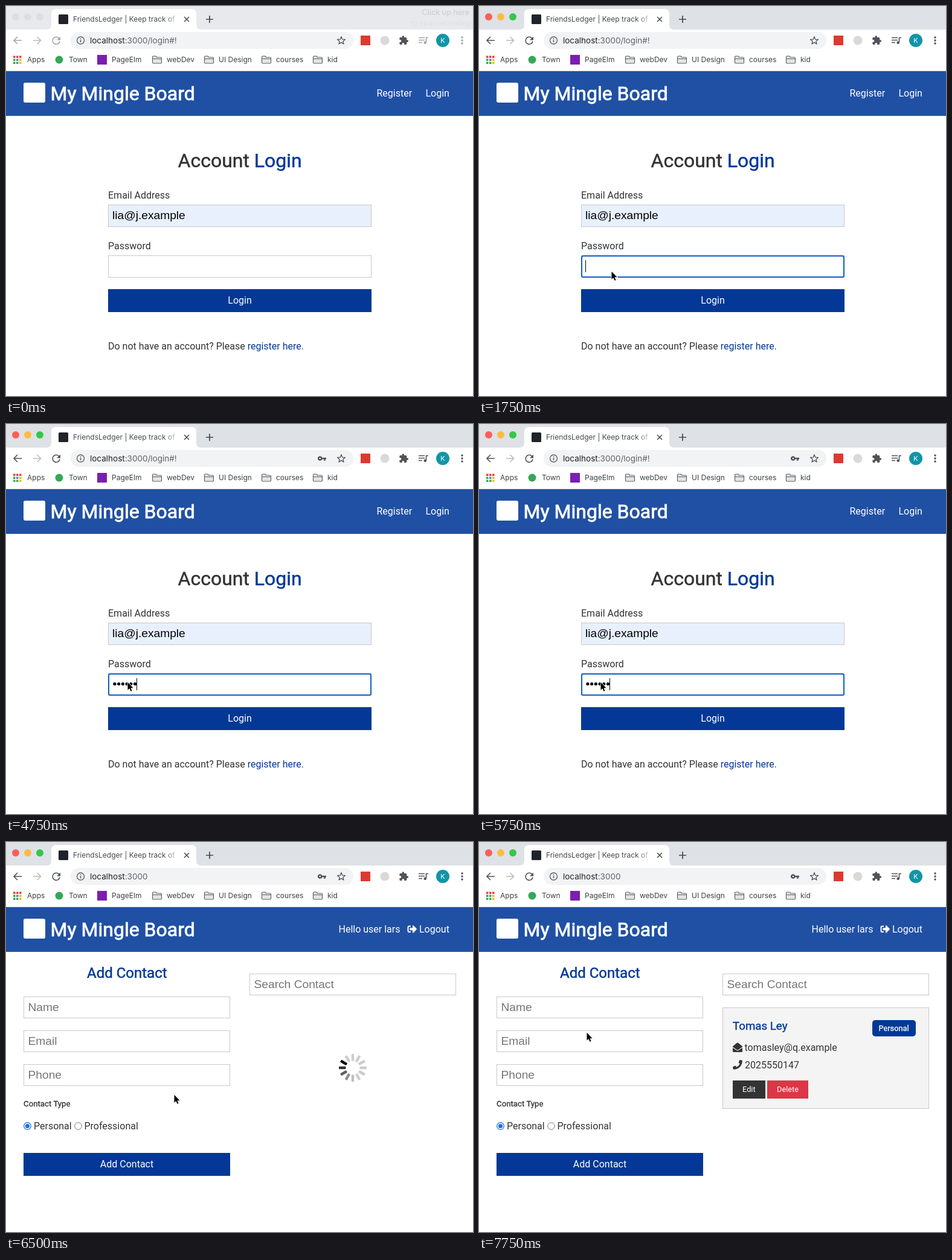
Write an HTML page that moves like this. It is 773 by 646 pixels and loops after 8000 ms.

```html
<!DOCTYPE html>
<html lang="en">
<head>
<meta charset="utf-8">
<title>Contact book login</title>
<style>
html, body { margin: 0; width: 100%; height: 100%; overflow: hidden; background: #fff; }
svg { display: block; width: 773px; height: 646px; }
text { white-space: pre; }
.ui { font-family: Inter, sans-serif; }
.page { font-family: Roboto, sans-serif; }
.field { font-family: "Liberation Sans", Arial, sans-serif; font-size: 19.2px; }
</style>
</head>
<body>
<svg id="stage" viewBox="0 0 773 646" xmlns="http://www.w3.org/2000/svg"></svg>
<script>
const LOOP = 8000;
const BLUE = '#033896', DARK = '#333', ICON = '#505357', FADED = '#a2a5a9';

const text = (cls, x, y, size, fill, s, more = '') =>
  `<text class="${cls}" x="${x}" y="${y}" font-size="${size}" fill="${fill}" ${more}>${s}</text>`;
const ui = (...a) => text('ui', ...a);
const page = (...a) => text('page', ...a);
const heavy = (x, y, size, fill, s, w = 0.5) =>
  page(x, y, size, fill, s, `stroke="${fill}" stroke-width="${w}"`);
const field = (x, y, fill, s) => `<text class="field" x="${x}" y="${y}" fill="${fill}">${s}</text>`;
const rect = (x, y, w, h, fill, more = '') =>
  `<rect x="${x}" y="${y}" width="${w}" height="${h}" fill="${fill}" ${more}/>`;
const box = (x, y, w, h, fill = '#fff') =>
  rect(x + 0.5, y + 0.5, w - 1, h - 1, fill, 'stroke="#c8c8c8"');
const disc = (x, y, r, fill, more = '') => `<circle cx="${x}" cy="${y}" r="${r}" fill="${fill}" ${more}/>`;
const path = (d, fill, more = '') => `<path d="${d}" fill="${fill}" ${more}/>`;
const line = (d, color, w = 1.6, more = '') =>
  path(d, 'none', `stroke="${color}" stroke-width="${w}" ${more}`);
const group = (id, body, more = '') => `<g id="${id}" ${more}>${body}</g>`;
const at = (x, y, k) => `transform="translate(${x} ${y}) scale(${k})"`;

const folder = x =>
  path(`M${x + 0.5} 84.5q0-1.5 1.5-1.5h4l1.7 2h6.3q1.5 0 1.5 1.5v7q0 1.5-1.5 1.5h-12q-1.5 0-1.5-1.5z`,
    '#e4e4e4', 'stroke="#5f6368" stroke-width="1.2"') +
  line(`M${x + 1} 87.5h14`, '#5f6368', 1);

function star(cx, cy, R, r) {
  let d = '';
  for (let i = 0; i < 10; i++) {
    const a = i * Math.PI / 5 - Math.PI / 2, q = i % 2 ? r : R;
    d += (i ? 'L' : 'M') + (cx + q * Math.cos(a)).toFixed(2) + ' ' + (cy + q * Math.sin(a)).toFixed(2);
  }
  return d + 'z';
}

function appGrid() {
  const colors = ['#ea4335', '#ea4335', '#ea4335', '#34a853', '#4285f4', '#fbbc05', '#34a853', '#34a853', '#fbbc05'];
  return colors.map((c, i) => rect(12 + (i % 3) * 5, 82.5 + Math.floor(i / 3) * 5, 3.5, 3.5, c)).join('');
}

// Controls whose colour depends on window focus
function controls(active) {
  const c = active ? ICON : FADED;
  const lights = active ? ['#fc5f58', '#fdbc40', '#34c748'] : ['#dcdee1', '#dcdee1', '#dcdee1'];
  return lights.map((f, i) => disc(16 + 20 * i, 18, 6, f)).join('') +
    line('M26 57H13.5M19 51l-6 6 6 6', c) +
    line('M87.5 53.2A6 6 0 1 0 89 58.5', c) + path('M90 50.5v6h-6z', c) +
    line('M683 52.5h10M683 56.5h10M683 60.5h6', c) +
    line('M695.5 60V52.5h3.5', c) + disc(693.7, 60.7, 2.3, c) +
    [52, 57, 62].map(y => disc(755, y, 1.7, c)).join('');
}

const chrome =
  rect(0, 0, 773, 39, '#dee1e6', 'id="strip"') +
  path('M67 39q8 0 8-8V13q0-8 8-8h224q8 0 8 8v18q0 8 8 8z', '#fff') +
  rect(0, 39, 773, 68, '#fff') +
  rect(0, 107, 773, 1, '#d8dade') +
  rect(87, 14, 16, 16, '#20232a', 'rx="1.5"') +
  ui(111, 26, 12, 'url(#fade)', 'FriendsLedger | Keep track of') +
  line('M295 18l8 8M303 18l-8 8', '#45494d', 1.5) +
  line('M337 16v12M331 22h12', '#45494d', 1.7) +
  group('idle', controls(false) +
    group('hint', ui(767, 15, 12.5, '#cdcfd2', 'Click up here', 'text-anchor="end" font-weight="500"') +
      ui(770, 33, 12.5, '#dfe1e4', 'to stop recording', 'text-anchor="end"'))) +
  group('active', controls(true)) +
  line('M45 57h12.5M51.5 51l6 6-6 6', '#b9bcbf') +
  rect(107, 43, 468, 28, '#f1f3f4', 'rx="14"') +
  disc(123.5, 57, 6, 'none', 'stroke="#5f6368" stroke-width="1.4"') +
  rect(122.7, 56, 1.6, 4.2, '#5f6368') + rect(122.7, 53.4, 1.6, 1.6, '#5f6368') +
  ui(139, 62, 13.5, '#202124', 'localhost<tspan fill="#5f6368">:3000<tspan id="route">/login#!</tspan></tspan>') +
  group('key', path('M12.65 10C11.83 7.67 9.61 6 7 6c-3.31 0-6 2.69-6 6s2.69 6 6 6c2.61 0 4.83-1.67 5.65-4H17v4h4v-4h2v-4H12.65zM7 14c-1.1 0-2-.9-2-2s.9-2 2-2 2 .9 2 2-.9 2-2 2z',
    ICON, at(515.3, 49.3, 0.64))) +
  line(star(555, 57.5, 6.8, 2.9), ICON, 1.3, 'stroke-linejoin="round"') +
  rect(587, 49, 16, 16, '#dc3a2f') +
  disc(627, 57, 7.5, '#d9d9d9') +
  path('M20.5 11H19V7c0-1.1-.9-2-2-2h-4V3.5a2.5 2.5 0 0 0-5 0V5H4c-1.1 0-2 .9-2 2v3.8h1.5a2.7 2.7 0 0 1 0 5.4H2V20c0 1.1.9 2 2 2h3.8v-1.5a2.7 2.7 0 0 1 5.4 0V22H17c1.1 0 2-.9 2-2v-4h1.5a2.5 2.5 0 0 0 0-5z',
    ICON, at(650, 48.5, 0.7)) +
  disc(723, 57, 11, '#1295a6') +
  ui(723, 61, 11, '#fff', 'K', 'text-anchor="middle"') +
  appGrid() +
  disc(88, 89, 6.5, '#34a853') +
  rect(151, 81, 16, 16, '#7a1fb0') +
  [242, 328, 423, 508].map(folder).join('') +
  [[35, 'Apps'], [104, 'Town'], [175, 'PageElm'], [266, 'webDev'], [352, 'UI Design'], [447, 'courses'], [532, 'kid']]
    .map(([x, s]) => ui(x, 93, 12, '#3c4043', s)).join('');

const banner =
  rect(0, 108, 773, 74, '#2050a3') +
  rect(29, 127, 36, 33, '#fff', 'rx="3"') +
  heavy(73.5, 155.5, 32, '#fff', 'My Mingle Board', 0.8);

const login =
  page(613.5, 150, 16, '#fff', 'Register') + page(694.5, 150, 16, '#fff', 'Login') +
  heavy(284.5, 266.5, 32, DARK, `Account <tspan fill="${BLUE}" stroke="${BLUE}">Login</tspan>`) +
  page(169, 319, 16, DARK, 'Email Address') +
  box(169, 329, 436, 37, '#e8f0fe') + field(176, 353, '#000', 'lia@j.example') +
  page(169, 403, 16, DARK, 'Password') +
  box(169, 413, 436, 37) +
  group('focus', rect(170, 414, 434, 35, '#fff', 'rx="2.5" stroke="#0f5fc0" stroke-width="2"')) +
  Array.from({ length: 6 }, (_, i) => disc(179.9 + 6.72 * i, 430.5, 2.6, '#000', 'class="dot"')).join('') +
  rect(176, 421, 1, 20, '#000', 'id="caret"') +
  rect(169, 469, 436, 38, BLUE) +
  page(387, 493, 16, '#fff', 'Login', 'text-anchor="middle"') +
  page(169, 569, 16, DARK, `Do not have an account? Please <tspan fill="${BLUE}">register here</tspan>.`);

const spinner = Array.from({ length: 12 }, (_, i) =>
  rect(-2.2, -23, 4.4, 11.5, '#ccc', `rx="1" class="bar" transform="translate(574 374) rotate(${i * 30})"`)).join('');

const card =
  box(403, 274, 342, 168, '#f4f4f4') +
  heavy(420, 311, 18.72, BLUE, 'Tomas Ley', 0.4) +
  rect(651, 295, 72, 27, BLUE, 'rx="5"') +
  heavy(661.5, 313, 12.8, '#fff', 'Personal', 0.3) +
  path('M420 338.5l6.5-5.5q1.5-1.2 3 0l6.5 5.5v8q0 1.5-1.5 1.5h-13q-1.5 0-1.5-1.5z', DARK) +
  line('M420 340l6.5 4.6q1.5 1 3 0L436 340', '#f4f4f4', 1.1) +
  page(439.5, 346, 16, DARK, 'tomasley@q.example') +
  path('M493.4 24.6l-104-24c-11.3-2.6-22.9 3.3-27.5 13.9l-48 112c-4.2 9.8-1.4 21.3 6.9 28l60.6 49.6c-36 76.7-98.9 140.5-177.2 177.2l-49.6-60.6c-6.8-8.3-18.2-11.1-28-6.9l-112 48C4 366-2 378 .6 389.4l24 104C27 504 37 512 48 512c256 0 464-207.5 464-464 0-11-8-21-18.6-23.4z',
    DARK, at(420, 361, 0.031)) +
  page(440, 375, 16, DARK, '2025550147') +
  rect(420, 395, 54, 30, DARK) + page(436, 414, 12.8, '#fff', 'Edit') +
  rect(477, 395, 68, 30, '#dc3747') + page(493, 414, 12.8, '#fff', 'Delete');

const home =
  page(652.5, 150, 16, '#fff', 'Hello user lars', 'text-anchor="end"') +
  line('M670 139.5h-2.5q-2 0-2 2v5.5q0 2 2 2h2.5', '#fff', 2) +
  path('M668.5 142.3h4.5v-3.3q.3-1.5 1.6-.6l5 5.2q.7.7 0 1.4l-5 5.2q-1.3.9-1.6-.6v-3.3h-4.5z', '#fff') +
  page(684, 150, 16, '#fff', 'Logout') +
  heavy(134, 225, 24, BLUE, 'Add Contact') +
  ['Name', 'Email', 'Phone'].map((s, i) =>
    box(29, 256 + 56 * i, 342, 36) + field(36.5, 280 + 56 * i, '#757575', s)).join('') +
  heavy(29, 438, 13.28, DARK, 'Contact Type', 0.3) +
  disc(35.5, 470.5, 5.8, '#fff', 'stroke="#1a73e8" stroke-width="1.3"') + disc(35.5, 470.5, 3.6, '#1a73e8') +
  page(46, 476, 16, DARK, 'Personal') +
  disc(119.5, 470.5, 5.8, '#fff', 'stroke="#767676"') +
  page(129.5, 476, 16, DARK, 'Professional') +
  rect(29, 515, 342, 38, BLUE) +
  page(200, 539, 16, '#fff', 'Add Contact', 'text-anchor="middle"') +
  box(403, 218, 342, 36) + field(410.5, 242, '#757575', 'Search Contact') +
  group('spinner', spinner) + group('card', card) +
  group('status', path('M-1 628.5H252q4 0 4 4V647H-1z', '#dee1e6', 'stroke="#b8bbc0"') +
    ui(2, 643, 11.6, '#3c4043', 'Waiting for localhost...'));

const stage = document.getElementById('stage');
stage.innerHTML =
  `<defs><linearGradient id="fade" gradientUnits="userSpaceOnUse" x1="262" x2="288" y1="0" y2="0">
    <stop offset="0" stop-color="#45494d"/><stop offset="1" stop-color="#45494d" stop-opacity="0"/></linearGradient></defs>` +
  rect(0, 0, 773, 646, '#fff') + chrome + banner + group('login', login) + group('home', home) +
  group('cursor', path('M.5 .8V13.8L3.4 11 5.5 15.8 7.5 15 5.5 10.2H9.5z', '#000',
    'stroke="#fff" stroke-width="1.6" paint-order="stroke"'));

const $ = id => document.getElementById(id);
const show = (el, on) => el.setAttribute('visibility', on ? 'inherit' : 'hidden');
const bars = [...document.querySelectorAll('.bar')];
const dots = [...document.querySelectorAll('.dot')];

// Time, x, y of each pointer rest
const moves = [[750, 217, 501], [1000, 217, 503], [1250, 218, 447], [1500, 218, 441], [1750, 219, 439],
  [2000, 203, 429], [2250, 201, 427], [6000, 202, 440], [6250, 236, 432], [6500, 278, 418],
  [6750, 281, 389], [7250, 548, 222], [7500, 508, 265], [7750, 178, 315]];
const keyTimes = [3500, 3500, 3750, 4250, 4500, 4750];
const caretOn = [[1750, 2250], [2750, 3250], [3500, 5250], [5750, 6000]];

function draw(t) {
  const active = t >= 1750, inside = t >= 6000, loaded = t >= 6750;
  $('strip').setAttribute('fill', active ? '#dee1e6' : '#e7e9ec');
  show($('idle'), !active);
  show($('active'), active);
  show($('hint'), !active && t < 250);
  show($('key'), t >= 3500);
  $('route').textContent = inside ? '' : '/login#!';

  show($('login'), !inside);
  show($('focus'), active && !inside);
  const typed = keyTimes.filter(k => t >= k).length;
  dots.forEach((d, i) => show(d, i < typed && !inside));
  $('caret').setAttribute('x', Math.round(176 + 6.72 * typed));
  show($('caret'), caretOn.some(([a, b]) => t >= a && t < b));

  show($('home'), inside);
  show($('spinner'), !loaded);
  show($('card'), loaded);
  show($('status'), t < 6500);
  $('status').setAttribute('opacity', t < 6250 ? 1 : 0.5);
  const head = 4 + 3 * Math.floor((t - 6000) / 250);
  bars.forEach((b, i) => {
    const age = ((head - i) % 12 + 12) % 12;
    const v = Math.min(204, age * 48);
    b.setAttribute('fill', `rgb(${v},${v},${v})`);
  });

  const pos = moves.filter(m => t >= m[0]).pop();
  show($('cursor'), !!pos);
  if (pos) $('cursor').setAttribute('transform', `translate(${pos[1]} ${pos[2]})`);
}

const start = performance.now();
function tick() {
  draw((performance.now() - start) % LOOP);
  requestAnimationFrame(tick);
}
draw(0);
requestAnimationFrame(tick);
</script>
</body>
</html>
```
